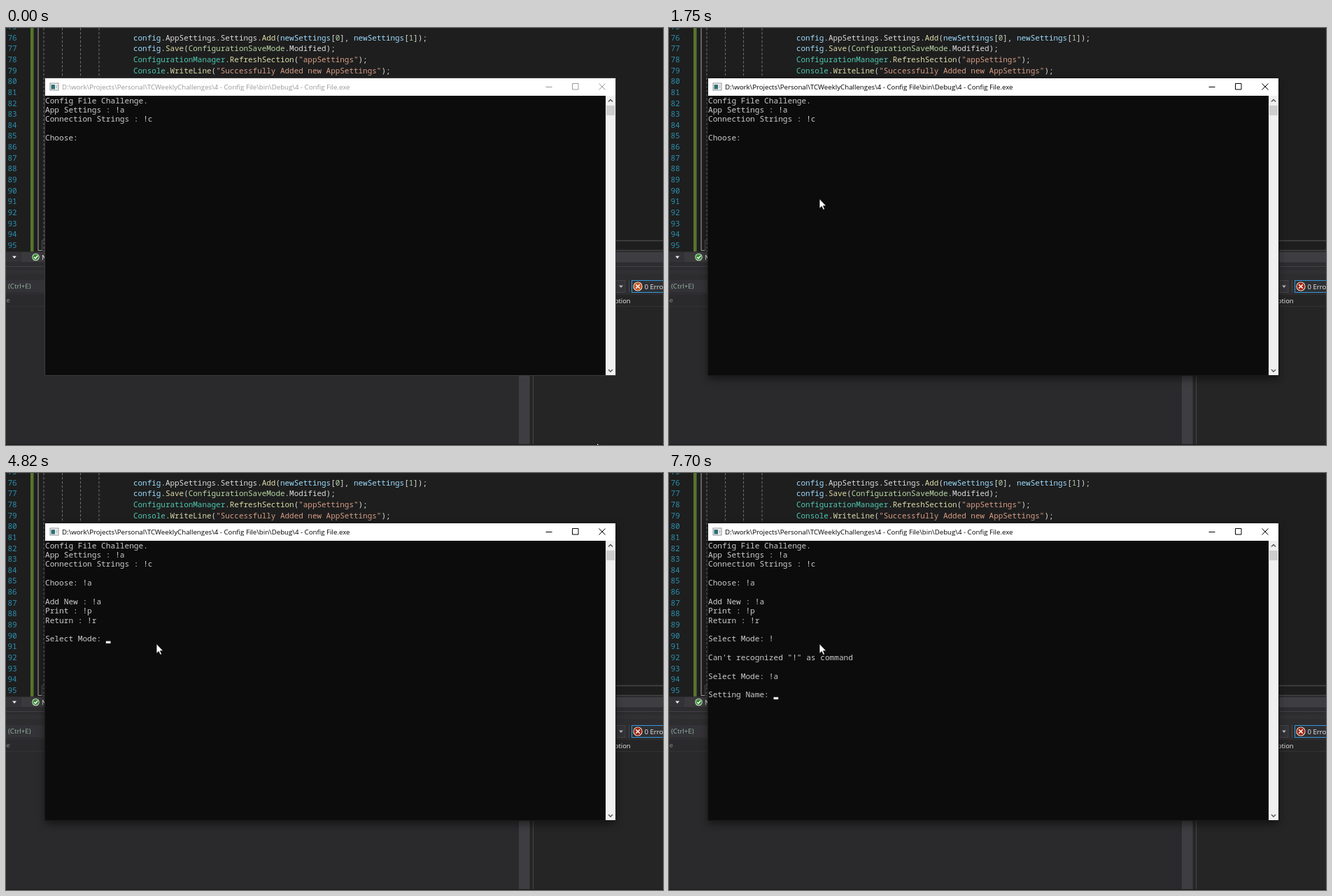
Write an HTML page that moves like this. It is 939x597 px and loops after 8000 ms.

```html
<!DOCTYPE html>
<html lang="en">
<head>
<meta charset="utf-8">
<title>Config File console</title>
<style>
html, body { margin: 0; width: 100%; height: 100%; overflow: hidden; background: #1e1e1e; }
svg { display: block; width: 939px; height: 597px; }
text { white-space: pre; }
.ui { font-family: "Open Sans", "Noto Sans", sans-serif; }
.mono { font-family: "Noto Sans Mono", "DejaVu Sans Mono", monospace; }
#shadow { filter: blur(6px); }
</style>
</head>
<body>
<svg id="stage" viewBox="0 0 939 597" xmlns="http://www.w3.org/2000/svg"></svg>
<script>
const LOOP = 8000, CELL = 6.68, ROW = 13.36, LEFT = 56, TOP = 97;
const stage = document.getElementById('stage');

const esc = s => s.replace(/&/g, '&amp;').replace(/</g, '&lt;');
const rect = (x, y, w, h, fill, more = '') =>
  `<rect x="${x}" y="${y}" width="${w}" height="${h}" fill="${fill}" ${more}/>`;
const dot = (x, y, r, fill) => `<circle cx="${x}" cy="${y}" r="${r}" fill="${fill}"/>`;
const path = (d, stroke, width = 1, more = '') =>
  `<path d="${d}" fill="none" stroke="${stroke}" stroke-width="${width}" ${more}/>`;
const ui = (x, y, s, fill, size = 9.7, more = '') =>
  `<text class="ui" x="${x}" y="${y}" font-size="${size}" fill="${fill}" ${more}>${esc(s)}</text>`;
const mono = (x, y, s, fill, size) =>
  `<text class="mono" x="${x}" y="${y}" font-size="${size}" fill="${fill}">${esc(s)}</text>`;
const tiny = (x, y, s, fill = '#c4c6ca', more = '') => ui(x, y, s, fill, 3.6, more);
const bold = 'font-weight="600"';
const group = (id, body, more = '') => `<g id="${id}" ${more}>${body}</g>`;

// Editor

const inks = { v: '#9cdcfe', p: '#dcdcdc', m: '#dcdcaa', t: '#4ec9b0', e: '#b8d7a3', s: '#d69d85', n: '#b5cea8' };
const code = [
  'v config|p .AppSettings.Settings.|m Add|p (|v newSettings|p [|n 0|p ], |v newSettings|p [|n 1|p ]);',
  'v config|p .|m Save|p (|e ConfigurationSaveMode|p .Modified);',
  't ConfigurationManager|p .|m RefreshSection|p (|s "appSettings"|p );',
  't Console|p .|m WriteLine|p (|s "Successfully Added new AppSettings"|p );'
];

function codeLine(line, i) {
  const spans = line.split('|').map(t => `<tspan fill="${inks[t[0]]}">${esc(t.slice(2))}</tspan>`).join('');
  return `<text class="mono" x="182" y="${17.8 + i * 15.63}" font-size="10.94">${spans}</text>`;
}

function editor() {
  let out = rect(0, 0, 939, 597, '#1e1e1e');
  for (let n = 75; n <= 95; n++) out += mono(2.5, 17.8 + (n - 76) * 15.63, String(n), '#2b91af', 10.94);
  out += rect(35, 0, 4.5, 320, '#577430') + path('M46 0V318.5H51', '#a5a5a5');
  out += path('M54 0V320M80.5 0V72M106.5 0V72M133 0V72', '#707070', 1, 'stroke-dasharray="3.4 2.5"');
  out += path('M56 304.5H51.5V318.5H56M871 304.5H939M871 318.5H939', '#464646', 1.4);
  return out + code.map(codeLine).join('');
}

function panels() {
  let out = rect(0, 320, 939, 277, '#2d2d30') + rect(0, 321, 22, 14, '#333337') + rect(22, 321, 34, 14, '#3a3a3d');
  out += rect(871, 321, 68, 14.5, '#3e3e42') + rect(0, 341, 939, 1, '#3f3f46');
  out += '<path d="M9 326.5h6l-3 3.5z" fill="#f1f1f1"/>';
  out += dot(42.5, 328, 5.2, '#f0f0f0') + dot(42.5, 328, 4.4, '#388a34') + path('M40 328l2 2 3.2-4', '#fff', 1.3);
  out += ui(51, 331.5, 'No issues found', '#f1f1f1', 9.5);
  out += path('M0 347.5H939M0 351.5H939', '#46464a', 1, 'stroke-dasharray="1 3"');
  out += path('M2 349.5H939', '#46464a', 1, 'stroke-dasharray="1 3"');
  out += rect(0, 361, 60, 17.5, '#333337') + ui(3, 373.4, '(Ctrl+E)', '#96b3a0', 9.7);
  out += rect(0, 382, 939, 215, '#252526') + rect(0, 382, 749, 215, '#2a2a2c');
  out += ui(0.5, 393, 'e', '#8a8a8c', 9.4) + path('M0 398.5H939', '#333337');
  out += rect(733, 398, 15.5, 199, '#3e3e42') + path('M753.5 398V597', '#46464a');
  out += rect(860, 361.5, 25, 17, '#333337', 'stroke="#434346"') + '<path d="M876 368.5h6l-3 3.4z" fill="#b8b8b8"/>';
  out += path('M890.5 361V379', '#46464a') + rect(894.5, 361.5, 60, 17, '#2f3033', 'stroke="#3399dd"');
  out += dot(903, 370, 6.6, '#f0f0f0') + `<circle id="errorDot" cx="903" cy="370" r="5.7"/>`;
  out += path('M900.2 367.2l5.6 5.6M905.8 367.2l-5.6 5.6', '#fff', 1.5);
  out += ui(912.5, 373.5, '0 Errors', '#f1f1f1', 9.6) + ui(842.5, 393.5, 'Description', '#f1f1f1', 9.4);
  return out + rect(0, 595.8, 939, 1.2, '#1b1b1d');
}

// Console window

const icon = (x, y, k) => `<g transform="translate(${x} ${y}) scale(${k})">` +
  rect(.5, .5, 12, 10, '#f4f4f4', 'stroke="#8d9499"') + rect(2, 2.6, 5.5, 6.4, '#2d6f70') + rect(8.6, 3, 2.4, 5, '#c9ced1') + '</g>';
const filePath = 'D:\\work\\Projects\\Personal\\TCWeeklyChallenges\\4 - Config File\\bin\\Debug\\4 - Config File';
const consoleText = (row, s) => mono(LEFT, TOP + row * ROW + 10.7, s, '#cccccc', CELL / .6);

function consoleWindow() {
  const chrome = ui(80, 87.6, filePath + '.exe', 'currentColor') +
    path('M771.5 84.5H780.5M809.5 79.5H818V88H809.5ZM847.5 79.5L856.5 88.5M856.5 79.5L847.5 88.5', 'currentColor');
  const body = rect(55.5, 71.5, 816, 426, '#0c0c0c', 'id="frame"') + rect(56, 72, 815, 25, '#fff') +
    icon(62.5, 78.5, 1) + group('chrome', chrome) +
    rect(857, 97, 14, 400, '#f0f0f0') + rect(858, 111, 12, 14, '#cdcdcd') +
    path('M861 105.6l3-3 3 3M861 489l3 3 3-3', '#505050', 1.4);
  const lines = ['Config File Challenge.', 'App Settings : !a', 'Connection Strings : !c', '', 'Choose:'];
  return body + lines.map((s, i) => consoleText(i, s)).join('');
}

// Task switcher

function recorderCard() {
  let out = icon(160, 40, 1.4) + ui(183, 51.6, 'ScreenToGif', '#fff', 9.5);
  out += rect(160.5, 62.5, 330, 225, 'none', 'stroke="#e8e8e8"');
  out += rect(160, 62, 331, 8, '#fff') + tiny(163, 67.4, 'ScreenToGif 21', '#222', bold) + path('M484 64l4 4M488 64l-4 4', '#999', .7);
  out += rect(160, 279, 331, 9, '#fff') + dot(380, 283.5, 2.4, '#c3c7cc') + path('M386 285l4-4', '#888', 1.2);
  out += dot(398.5, 283.3, 4, '#d84a38') + tiny(404, 284.8, '15  - fps   1125 × 715 px', '#555');
  return out + rect(460, 281, 1.4, 5, '#1769aa') + rect(462.3, 281, 1.4, 5, '#1769aa') + tiny(465, 285, 'Pause', '#222') +
    rect(476, 281, 5, 5, '#1769aa') + tiny(482, 285, 'Stop', '#222');
}

function consoleCard() {
  const k = .534;
  return rect(498, 34, 450, 258, '#141414', 'stroke="#fff" stroke-width="2"') + icon(502.5, 40, 1.4) +
    ui(526, 51.6, filePath.replace(/ File$/, '...'), '#fff', 9.6) +
    `<use href="#window" transform="translate(${502 - 56 * k} ${62 - 72 * k}) scale(${k})"/>`;
}

const bubble = (x, y, w, h, lines, fill = '#3a3b3c') => rect(x, y, w, h, fill, 'rx="3"') +
  lines.map((s, i) => tiny(x + 2.5, y + 4.3 + i * 4.2, s, '#e4e6eb', i ? '' : bold)).join('');

function sharedLink(y, words) {
  return rect(380, y, 76, 21, '#3a3b3c') + rect(380, y, 21.5, 21, '#e9edf3') + rect(380, y, 21.5, 4, '#7ba3cc') +
    rect(383, y + 8, 6, 6, '#a87a7a') + rect(391, y + 7, 8, 11, '#c1cbd8') +
    tiny(404, y + 5, 'DOCS.EXAMPLE.COM', '#9a9ca0') + words.map((s, i) => tiny(404, y + 10.5 + i * 4.3, s, '#e4e6eb')).join('');
}

function feed() {
  let out = rect(361, 361, 191, 13.5, '#242526') + rect(363, 363.5, 9, 8.5, '#f0f0f0') +
    ui(375, 369.8, 'Community: VELDRA QN', '#e4e6eb', 4.3, bold);
  out += rect(509, 364, 18, 8, '#2d88ff', 'rx="1"') + tiny(512, 369.3, '+ Invite', '#fff') +
    rect(529, 364, 10, 8, '#3a3b3c', 'rx="1"') + dot(534, 368, 1.5, '#ddd') + rect(541, 364, 10, 8, '#3a3b3c', 'rx="1"') + tiny(544, 369, '···', '#eee');
  out += rect(361, 374.5, 106, 171.5, '#242526') + path('M361 374.5V520', '#2d5f9e', .8) + rect(372, 374.5, 21, 3.5, '#e9edf3');
  for (const y of [382, 424, 440.5, 456.7, 477, 518]) out += tiny(382, y, 'Like · Reply · 2h', '#9a9ca0');
  for (const y of [387, 430, 446, 462, 482]) out += dot(375.5, y, 2.5, '#a58f86');
  out += bubble(380, 384, 76, 15, ['Noel Brix Harven', 'Done! Hope you could answer my survey, too']) + tiny(382.5, 397, 'https://docs.example.com/forms/d/e', '#4a9bf5');
  out += sharedLink(400, ["A survey on people's daily", 'travel experience in Metro...']);
  out += bubble(380, 427, 28, 10, ['Tessa Crell', 'Mirabel, done!']);
  out += bubble(380, 443, 71, 10, ['Mirabel Matsen', 'Tessa Crell, thanks! Will answer yours']) + dot(445, 449, 1.8, '#f7b928');
  out += bubble(380, 459, 79, 15, ['Mirabel Matsen', 'Noel Brix Harven, done! Thank you', 'for answering!']) + dot(413, 471, 1.8, '#f7b928');
  out += bubble(380, 479, 79, 14, ['Jia Dallren', 'Done! Can you answer my survey as well']) + tiny(382.5, 491.4, 'you? https://docs.example.com/forms', '#4a9bf5');
  out += sharedLink(494, ['Social Networking Apps/Sites', 'Usage of Filipino During...']) + tiny(374, 524, '↳ View 6 more replies', '#c4c6ca');
  for (const [x, y, s] of [[381, 528, 'Write a reply...'], [371, 538, 'Write a comment...']])
    out += dot(x - 5, y + 3.5, 2.5, '#b08d80') + rect(x, y, 466 - x, 7, '#3a3b3c', 'rx="3.5"') + tiny(x + 3, y + 4.8, s, '#9a9ca0') + tiny(443, y + 4.8, '☺ ○ □ ○', '#aaa');
  out += rect(472, 378, 79.5, 71, '#242526', 'rx="2"') + tiny(476, 386, 'About', '#e4e6eb', bold);
  ['Community: VELDRA QN is the official online', 'community for "Veldra Nationwide by Data', 'Analytics (R&D, Training and Practice)"', 'Project. See More']
    .forEach((s, i) => out += tiny(476, 393 + i * 4.2, s, '#c4c6ca', 'style="font-size:3.1px"'));
  [['Privacy', 'Only members can see who\'s in the group', 'and what they post'], ['Visible', 'Anyone can find this group'], ['General Group']]
    .forEach((item, i) => {
      const y = [412.5, 428.5, 442][i];
      out += dot(478, y - 1, 1.7, '#ddd') + item.map((s, j) => tiny(482, y + j * 4.3, s, j ? '#b0b3b8' : '#e4e6eb', j ? '' : bold)).join('');
    });
  return out;
}

function chat() {
  const red = '#f0384f';
  let out = rect(574, 449.5, 74, 101, '#242526', 'rx="3"') + dot(580, 455.5, 3, '#b49a84') + tiny(585, 457, 'Orla Fenn Cr... ⌄', '#e4e6eb', bold);
  for (const x of [617, 626, 633]) out += dot(x, 455.5, 1.4, '#ddd');
  out += path('M639 454l3 3M642 454l-3 3', '#ddd', .7);
  out += rect(598, 461, 39, 19, '#7a4a25') + rect(601, 461, 16, 8, '#c68644') + rect(603, 470, 23, 6, '#f1e4cf') + rect(630, 462, 6, 16, '#3c2119');
  out += rect(598, 480, 39, 13, '#3a3b3c') + tiny(600, 486, 'Whole Eggs Leche Flan', '#eee') + tiny(600, 490.5, 'kitchen.example.com', '#999') + tiny(604, 496.7, '11:04 AM', '#999');
  out += dot(579.5, 506, 2.7, '#b49a84') + bubble(585, 498, 36, 10.5, ['I think you', 'reached midnight']);
  out += bubble(593, 510, 44, 10.5, ['make online plan for', 'replies'], red) + bubble(596, 521, 41, 7.5, ['did not bake the cake'], red) + bubble(606, 529.5, 31, 8, ['It takes history'], red);
  out += rect(642.5, 461, 3.5, 50, '#e4e6eb') + rect(642.5, 515, 3.5, 24, '#e4e6eb');
  out += dot(579, 545, 2, '#ddd') + rect(584, 541.5, 50, 7, '#3a3b3c', 'rx="3.5"') + tiny(587, 546.3, 'Aa', '#aaa') + tiny(623, 546.5, '⊕ ☺', '#ddd') + dot(641.5, 545, 2.3, red);
  return out + dot(655, 533, 5, '#d5d2cc') + dot(655, 535, 3, '#6c6558') + dot(655, 545, 5, '#e4e6eb') + dot(655, 545, 2, '#333');
}

function browserCard() {
  let out = dot(257, 312.5, 9.2, '#db4437') + ui(271, 316.2, 'Community: VELDRA QN | Chatfold - Plimbo Wander', '#fff', 9.6);
  out += rect(247, 325, 420, 228.5, '#18191a') + rect(247, 325, 420, 8, '#dee1e6') + rect(302, 326, 53, 7, '#fff');
  out += dot(252.5, 329.7, 1.5, '#555') + tiny(256, 331, 'samplerepo/TCWeeklyChall', '#444', 'style="font-size:3.2px"') + dot(305.5, 329.7, 1.6, '#1877f2') +
    tiny(309, 331, 'Community: VELDRA QN', '#333', 'style="font-size:3.2px"') + tiny(297, 331, '×', '#555') + tiny(350, 331, '×   +', '#555') + tiny(641, 331, '–    □    ×', '#333');
  out += rect(247, 333, 420, 14.5, '#fff') + tiny(250, 338.8, '←  →  ⟳', '#555') + rect(268, 334, 330, 6.3, '#f1f3f4', 'rx="3"') +
    tiny(273, 338.5, 'chatfold.example/groups/2384015/permalink/382991/?comment_id=38301&reply_comment_id=38302', '#555');
  ['#e8a33d', '#b5443c', '#222', '#3f7fd1', '#888', '#3b6ea8', '#d06a52', '#5f6368'].forEach((c, i) => out += dot(604 + i * 7.4, 337.3, 1.8, c));
  ['Apps', 'Mailbox', 'Videos', 'Social', 'Research', 'Docs', 'Tasks'].forEach((s, i) => out += rect(251 + i * 17.5, 342.3, 2.6, 2.6, i % 2 ? '#f0b84d' : '#c9574c') + tiny(255 + i * 17.5, 345.4, s, '#444', 'style="font-size:3.1px"'));
  out += rect(247, 347.5, 420, 13.5, '#242526') + dot(255, 354.7, 4.3, '#1877f2') + dot(265.5, 354.7, 4, '#3a3b3c') + path('M264 353l3 3', '#ccc', .8);
  for (let i = 0; i < 5; i++) out += rect(402 + i * 25.8, 352.8, 4, 3.8, 'none', 'stroke="#b0b3b8" stroke-width=".9" rx="1"');
  out += dot(606, 354.7, 2.8, '#c49d8a') + tiny(610, 356, 'Jia', '#eee', bold);
  for (let i = 0; i < 4; i++) out += dot(624.5 + i * 10.6, 354.7, 4, '#3a3b3c') + dot(624.5 + i * 10.6, 354.7, 1.6, '#e4e6eb');
  return out + rect(664, 347.5, 3, 206, '#ececec') + rect(664, 491, 3, 5, '#a8a8a8') + feed() + chat();
}

function folderCard() {
  let out = rect(681, 305, 11, 15, '#f3c64e') + rect(681, 305, 4, 15, '#ffe39a') + ui(702, 316.2, 'Personal', '#fff', 9.6);
  out += rect(677.5, 325.5, 262, 228, '#fff') + tiny(680, 330, '▪ ▪ | Personal', '#d99b26') + rect(678, 331, 11.5, 6, '#1979ca') + tiny(681, 335.3, 'File', '#fff');
  ['Home', 'Share', 'View'].forEach((s, i) => out += tiny(693 + i * 13, 335.3, s, '#333'));
  out += path('M678 337.5H939M678 343.5H939', '#ddd', .6) + tiny(680, 342, '←  →  ↑', '#555') + rect(702, 338.8, 4, 3.6, '#f3c64e') +
    tiny(708, 342, '› This PC › DATA (D:) › work › Projects › Personal ›', '#333');
  [['Name', 716], ['Date modified', 773], ['Type', 805], ['Size', 831]].forEach(([s, x]) => out += tiny(x, 349, s, '#666'));
  ['VeldraData Survey', 'TCWeeklyChallenges'].forEach((s, i) => {
    const y = 355.5 + i * 4.7;
    out += rect(716.5, y - 3, 3, 3, '#f3c64e') + tiny(721, y, s, '#222') + tiny(773, y, '7/11/2020 3:21 PM', '#777') + tiny(805, y, 'File folder', '#777');
  });
  out += rect(678, 410.2, 34, 5, '#d4d4d4');
  ['Quick access', 'Skyshelf', 'This PC', '3D Objects', 'Desktop', 'Documents', 'Downloads', 'Music', 'Pictures', 'Videos', 'OS (C:)', 'DATA (D:)', 'Network', 'DESKTOP-AB12', 'NAS1']
    .forEach((s, i) => {
      const y = 352.5 + i * 5.4 + (i > 1 ? 2.5 : 0), x = i < 3 || i === 12 ? 684 : 686;
      out += rect(x, y - 2.8, 3, 2.8, i === 5 ? '#8aa0b4' : '#3a8fd0') + tiny(x + 4.5, y, s, '#333', 'style="font-size:3.3px"');
    });
  return out + tiny(681, 551.5, '2 items', '#555');
}

const switcher = () => rect(137, 13, 802, 563, '#121212', 'fill-opacity=".84"') +
  recorderCard() + consoleCard() + browserCard() + folderCard();

// Timeline: text typed after "Choose: "; a final underscore is the lit caret

const menu = '!a\n\nAdd New : !a\nPrint : !p\nReturn : !r\n\nSelect Mode: ';
const retry = menu + '!\n\nCan\'t recognized "!" as command\n\nSelect Mode: ';
const steps = [
  [0, ''], [2270, '_'], [2420, '!_'], [2730, '!'], [3120, '!a_'], [3270, '!a'],
  [3730, menu], [3810, menu + '_'], [4360, menu], [4820, menu + '_'],
  [5130, menu + '!_'], [5360, menu + '!'], [5910, menu + '!_'],
  [6300, retry + '_'], [7000, retry], [7310, retry + '!_'], [7470, retry + '!a'], [7550, retry + '!a_'],
  [7700, retry + '!a\n\nSetting Name: _']
];
const indent = ' '.repeat('Choose: '.length);

const pointerShape = '<path d="M0 0V14L3.2 11L5.4 15.8L7.6 14.9L5.5 10.2H9.9Z" fill="#fff" stroke="#000" stroke-width=".8"/>';
stage.innerHTML = editor() + panels() + rect(56, 75, 815, 427, '#000', 'id="shadow" fill-opacity=".5"') +
  group('window', consoleWindow()) + group('typed', '') +
  group('switcher', switcher()) + group('pointer', pointerShape);
const part = id => document.getElementById(id);
const [shadow, frame, chrome, typed, overlay, pointer, errorDot] =
  ['shadow', 'frame', 'chrome', 'typed', 'switcher', 'pointer', 'errorDot'].map(part);

function typedMarkup(output) {
  const lit = output.endsWith('_');
  const lines = (indent + (lit ? output.slice(0, -1) : output)).split('\n');
  const last = lines.length - 1;
  const caret = lit ? rect(LEFT + lines[last].length * CELL, TOP + (5 + last) * ROW - 3.3, CELL, 3.3, '#f2f2f2') : '';
  return lines.map((s, i) => consoleText(4 + i, s)).join('') + caret;
}

function pointerAt(t) {
  const hop = Math.min(7, Math.max(0, Math.floor((t - 70) / 80) + 1));
  const p = (1 - Math.cos(Math.PI * hop / 7)) / 2;
  return [844.5 - 629.5 * p, 594 - 349.5 * p];
}

let shown = null;
function draw(t) {
  const output = steps.filter(s => s[0] <= t).pop()[1];
  if (output !== shown) typed.innerHTML = typedMarkup(shown = output);
  const active = t >= 1750;
  shadow.style.display = active ? '' : 'none';
  frame.setAttribute('stroke', active ? '#1a1a1a' : '#3c3c3c');
  chrome.setAttribute('color', active ? '#000' : '#999');
  errorDot.setAttribute('fill', active ? '#a1260d' : '#c4531f');
  overlay.style.display = t >= 1640 && !active ? '' : 'none';
  pointer.setAttribute('transform', `translate(${pointerAt(t).join(' ')})`);
}

const start = performance.now();
function tick() {
  draw((performance.now() - start) % LOOP);
  requestAnimationFrame(tick);
}
tick();
</script>
</body>
</html>
```
